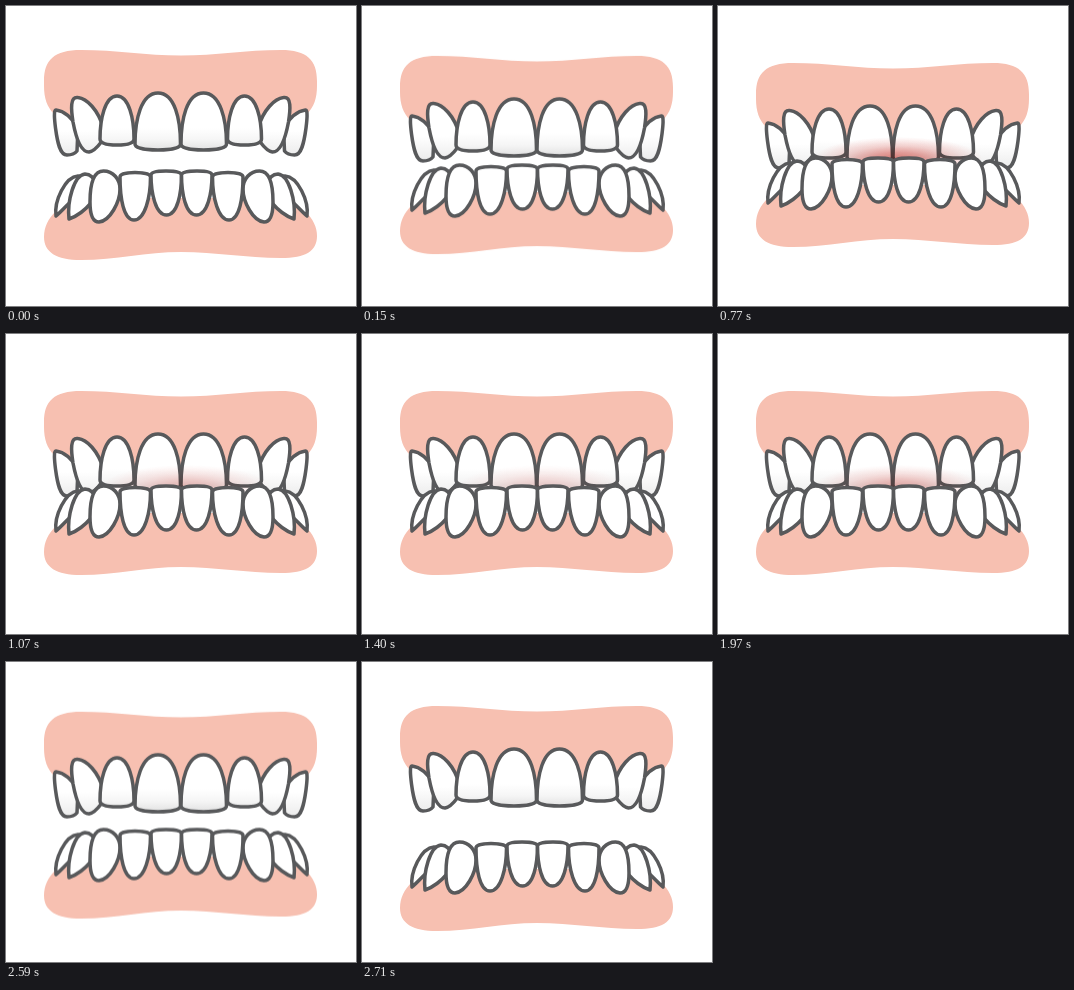
An HTML page without scripts that plays this animation: 350 px wide and 300 px high, repeating every 2940 ms.

```html
<!DOCTYPE html>
<html lang="en">
<head>
<meta charset="utf-8">
<title>Teeth grinding</title>
<style>
  html, body { margin: 0; width: 100%; height: 100%; overflow: hidden; background: #fff; }
  svg { display: block; width: 350px; height: 300px; }
  .gum { fill: #f7c0b1; }
  .teeth { stroke: #58595b; stroke-width: 3.5; stroke-linejoin: round; }
  #upper, #lower, #glow { animation: 2940ms linear -2ms infinite; }
  #upper { animation-name: upper; }
  #lower { animation-name: lower; }
  #glow { animation-name: glow; mix-blend-mode: multiply; }

  /* close in 11 steps, open in 9 */
  @keyframes upper {
    0% { transform: translateY(0); animation-timing-function: steps(11); }
    11.2245% { transform: translateY(13px); }
    82.9932% { transform: translateY(13px); animation-timing-function: steps(9); }
    92.1769%, 100% { transform: translateY(0); }
  }
  @keyframes lower {
    0% { transform: translateY(0); animation-timing-function: steps(11); }
    11.2245% { transform: translateY(-13px); }
    82.9932% { transform: translateY(-13px); animation-timing-function: steps(9); }
    92.1769%, 100% { transform: translateY(15px); }
  }
  /* two pulses of pain */
  @keyframes glow {
    0%, 17.007% { opacity: 0; }
    28.231% { opacity: 1; }
    42.517%, 43.197% { opacity: 0; }
    58.844% { opacity: 1; }
    76.19%, 100% { opacity: 0; }
  }
</style>
</head>
<body>
<svg viewBox="0 0 350 300">
  <defs>
    <linearGradient id="shade" gradientUnits="userSpaceOnUse" x1="0" y1="122" x2="0" y2="146">
      <stop offset="0" stop-color="#fff"/>
      <stop offset=".5" stop-color="#f5f5f5"/>
      <stop offset="1" stop-color="#dedede"/>
    </linearGradient>
    <linearGradient id="pale" gradientUnits="userSpaceOnUse" x1="0" y1="125" x2="0" y2="149">
      <stop offset="0" stop-color="#fff"/>
      <stop offset="1" stop-color="#ececec"/>
    </linearGradient>
    <radialGradient id="pain">
      <stop offset="0" stop-color="#d8443c" stop-opacity=".8"/>
      <stop offset=".3" stop-color="#d8443c" stop-opacity=".6"/>
      <stop offset=".6" stop-color="#d8443c" stop-opacity=".28"/>
      <stop offset="1" stop-color="#d8443c" stop-opacity="0"/>
    </radialGradient>

    <g id="topHalf">
      <g fill="url(#pale)">
        <path d="M50 104C47.500 104 48.500 114 49.500 122C51.500 137 54 149 61 149C65 149 69 147.500 71 145L72 122C66 112 58 105 50 104Z"/>
        <path d="M72 91.500C64 90 65 103 67 116C70 132 75 146 83 146C89 145 93 139 96 135L97 121C92 104 81 92.500 72 91.500Z"/>
      </g>
      <g fill="url(#shade)">
        <path d="M94 133C94 113 99 90 111 90C123 90 128 113 128 133C128 138 120 139 111 139C102 139 94 138 94 133Z"/>
        <path d="M129 138C129 114 135 87 152 87C169 87 174.500 114 174.500 138C174.500 142 165 144 152 144C139 144 129 142 129 138Z"/>
      </g>
    </g>

    <g id="bottomHalf">
      <path d="M50 210C48 195 59 171 72 170C78 170 80 175 80 178L70 192C63 196 57 204 50 210Z"/>
      <path d="M63 213C61 195 68 169 79 168C85 168 89 173 92 180L86 196C80 203 72 210 63 213Z"/>
      <path d="M97.500 165C87 165 84 180 84 196C84 209 87 216 93 216C104 215 114 196 114 183C114 173 107 165 97.500 165Z"/>
      <path d="M114 171C114 168 121 166.500 129 166.500S144.500 168 144.500 171C144.500 191 139 214 128 214C117.500 214 114 192 114 171Z"/>
      <path d="M145 169C145 166 152 165 160 165S175.500 166 175.500 169C175.500 187 171.500 209 160.500 209C149.500 209 145 187 145 169Z"/>
    </g>
  </defs>

  <g id="upper">
    <path class="gum" d="M48 108C41 101 38 92 38 80V75C38 54 48 44 75 44C110 44 140 49.500 175 49.500C210 49.500 240 44 275 44C301 44 311 54 311 75V80C311 92 308 101 301 108L290 118H60Z"/>
    <g class="teeth">
      <use href="#topHalf"/>
      <use href="#topHalf" transform="translate(349.500) scale(-1 1)"/>
    </g>
  </g>

  <ellipse id="glow" cx="180" cy="153" rx="84" ry="22" fill="url(#pain)"/>

  <g id="lower">
    <path class="gum" d="M50 205C42 213 38 221 38 231C38 246 50 254 75 254C110 254 140 246 175 246C210 246 240 252 275 252C300 252 311 245 311 230C311 221 307 213 299 205L290 192H60Z"/>
    <g class="teeth" fill="#fff">
      <use href="#bottomHalf"/>
      <use href="#bottomHalf" transform="translate(351) scale(-1 1)"/>
    </g>
  </g>
</svg>
</body>
</html>
```
